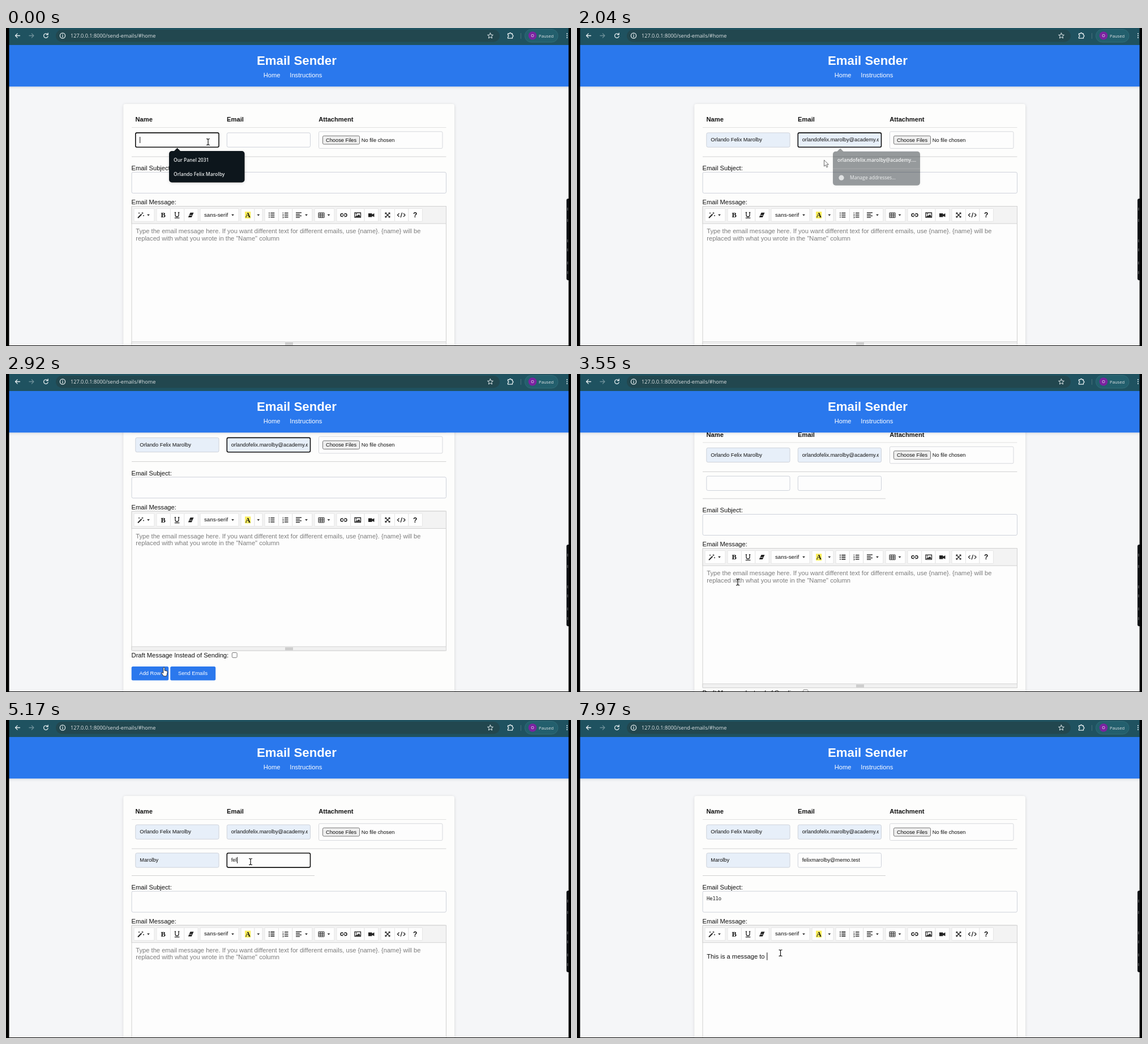
Write an HTML page that moves like this. It is 998 px wide and 561 px high and loops after 8000 ms.

```html
<!DOCTYPE html>
<html lang="en">
<head>
<meta charset="utf-8">
<title>Email Sender</title>
<style>
  html, body { margin: 0; width: 100%; height: 100%; overflow: hidden; background: #000; }
  svg { display: block; width: 100vw; height: 100vh; }
  text { font-family: "Liberation Sans", Arial, sans-serif; font-size: 11.15px; fill: #111; white-space: pre; }
  .small { font-size: 9.27px; }
  .bold { font-weight: 700; }
  .ui { font-family: "Open Sans", "Noto Sans", sans-serif; font-size: 8.5px; fill: #dfe3e5; }
  .semi { font-weight: 600; fill: #e8ebec; }
  .mono { font-family: "Noto Sans Mono", "DejaVu Sans Mono", monospace; font-size: 8.7px; }
  .hint { fill: #7d7d7d; }
  .white { fill: #fff; }
  .icon { fill: none; stroke: #222; stroke-width: 1.3; }
  .bar { fill: none; stroke: #e6eef0; stroke-width: 1.3; stroke-linecap: round; stroke-linejoin: round; }
</style>
</head>
<body>
<svg id="stage" viewBox="0 0 998 561" preserveAspectRatio="none"></svg>
<script>
const LOOP = 8000;
const PERSON = 'Orlando Felix Marolby';
const ADDRESS = 'orlandofelix.marolby@academy.example';
const SECOND_NAME = 'Marolby';
const SECOND_ADDRESS = 'felixmarolby@memo.test';
const MESSAGE = 'This is a message to ';
const ROW_HEIGHT = 47.7;

// Markup helpers
const text = (x, y, value, cls = '', id = '') =>
  `<text x="${x}" y="${y}" class="${cls}"${id && ` id="${id}"`}>${value}</text>`;
const rect = (x, y, w, h, fill, stroke = 'none', r = 0, extra = '') =>
  `<rect x="${x}" y="${y}" width="${w}" height="${h}" rx="${r}" fill="${fill}" stroke="${stroke}" ${extra}/>`;
const path = (d, cls = 'icon', extra = '') => `<path d="${d}" class="${cls}" ${extra}/>`;
const solid = (d, fill = '#222') => `<path d="${d}" fill="${fill}"/>`;
const line = (x1, x2, y, color) => path(`M${x1} ${y}H${x2}`, '', `stroke="${color}"`);
const group = (id, body, extra = '') => `<g id="${id}" ${extra}>${body}</g>`;
const drop = x => solid(`M${x - 2.4} 328.7h4.8l-2.4 2.8z`);

const field = (id, x, y) =>
  rect(x + .3, y + .4, 147.2, 25.3, '#fdfdfd', '#ced2da', 2.5, `id="${id}"`) +
  `<svg x="${x + 6}" y="${y}" width="137" height="26">${text(1.7, 15.9, '', 'small', id + 'Text')}</svg>`;

function menu(id, x, y, w, h, tip, body) {
  return group(id,
    rect(x, y, w, h, '#10171b', 'none', 5, 'filter="url(#shadow)"') +
    solid(`M${tip - 6} ${y + .5}l6 -6 6 6z`, '#10171b') + body);
}
function addressMenu(id, x, y, w, h, tip, first) {
  return menu(id, x, y, w, h, tip,
    text(x + 8, y + 18.5, first, 'ui semi') +
    line(x, x + w, y + 30.5, '#3a4145') +
    `<circle cx="${x + 15}" cy="${y + 46.5}" r="4.6" fill="#b9bec1"/>` +
    text(x + 30, y + 49.7, 'Manage addresses...', 'ui'));
}

function browserBar() {
  return rect(0, 0, 998, 30, '#1f5260') + rect(88, 3, 784, 21.5, '#22474f', 'none', 10.7) +
    path('M24.5 13.5h-8m3.6-3.6l-3.6 3.6 3.6 3.6', 'bar') +
    path('M41 13.5h8m-3.6-3.6l3.6 3.6-3.6 3.6', 'bar', 'opacity=".4"') +
    path('M73.4 11.2a3.8 3.8 0 1 0 .7 3.4M74.2 9v2.8h-2.8', 'bar') +
    `<circle cx="100" cy="13.5" r="4.6" class="bar"/>` + path('M100 13v2.8M100 11v.1', 'bar') +
    text(114, 17, '127.0.0.1:8000/send-emails/#home', 'ui', 'url') +
    path('M855.5 8.8l1.4 3.2 3.5.3-2.7 2.3.9 3.4-3.1-1.8-3.1 1.8.9-3.4-2.7-2.3 3.5-.3z', 'bar', 'style="stroke-width:1"') +
    path('M886.5 10h2.6a1.5 1.5 0 0 1 3 0h2.4v2.6a1.5 1.5 0 0 1 0 3v2.6h-8v-2.6a1.5 1.5 0 0 0 0-3z', 'bar') +
    path('M909.5 9v10', '', 'stroke="#47717b"') +
    rect(916.5, 2.5, 58.5, 22.5, '#235f6d', '#316c78', 11) +
    `<circle cx="930" cy="13.5" r="7.3" fill="#7a23a0"/>` +
    text(927.2, 16.3, 'O', 'ui white', 'initial') + text(941, 16.7, 'Paused', 'ui', 'paused') +
    [10, 13.5, 17].map(y => `<circle cx="991" cy="${y}" r="1" fill="#e6eef0"/>`).join('');
}

function banner() {
  return rect(0, 30, 998, 73.3, '#2b78ed', 'none', 0, 'filter="url(#shadow)"') +
    text(442.9, 65, 'Email Sender', 'bold white', 'title') +
    text(454.7, 86.9, 'Home', 'white') + text(501.3, 86.9, 'Instructions', 'white');
}

function toolbar() {
  const buttons = [[226, 36], [266, 24.4], [290.4, 24.4], [314.8, 24.4], [343, 68], [415, 24], [439, 14],
    [457, 24.4], [481.4, 24.4], [505.8, 35], [545, 35], [584, 24.6], [608.6, 24.6], [633.2, 24.6],
    [662, 24.5], [686.5, 24.5], [711, 24.5]];
  const rows = [326.5, 330, 333.5];
  return rect(222, 314.5, 555.5, 30.5, '#f3f3f3', '#d2d2d2') +
    buttons.map(([x, w]) => rect(x, 318.5, w, 22.7, '#fefefe', '#e5e5e5', 1)).join('') +
    path('M233 335l6.5-6.5', 'icon', 'style="stroke-width:2"') +
    path('M241 325v3M239.5 326.5h3M235 325.5v2M234 326.5h2M243 330v2M242 331h2', 'icon', 'style="stroke-width:.9"') +
    drop(251.5) +
    `<g font-weight="700">` + text(273.4, 334.3, 'B', 'glyph') +
    rect(422, 324, 10.2, 12, '#fbee5c') + text(422.7, 334, 'A', 'glyph') + '</g>' +
    path('M299 325.5v4.5a3 3 0 0 0 6 0v-4.5M297.7 325.5h2.5M303.8 325.5h2.5M297.8 335.2h8.6') +
    solid('M325.5 325.8h6l-3.7 8.2h-6z') + path('M323.5 330.5h5', '', 'stroke="#fff" stroke-width=".8"') +
    text(350, 332.8, 'sans-serif', '', 'family') + drop(400.5) + drop(445.8) +
    rows.map(y => path(`M464 ${y}h1.8M467.3 ${y}h7`, 'icon', 'style="stroke-width:1.7"') +
      path(`M492 ${y}h6.5`, 'icon', 'style="stroke-width:1.5"')).join('') +
    path('M489.3 325v2.6M488.4 329.2h1.7v1.5h-1.7M488.4 333h1.7v2h-1.7', 'icon', 'style="stroke-width:.8"') +
    [10, 7, 10, 7].map((w, i) => path(`M512 ${325.8 + i * 2.8}h${w}`)).join('') + drop(530.5) +
    path('M552 326h10v8.5h-10zM552 328.8h10M552 331.6h10M555.3 326v8.5M558.7 326v8.5', 'icon', 'style="stroke-width:1"') +
    drop(570) +
    path('M595.5 327.5h-2a2.5 2.5 0 0 0 0 5h2M597.5 327.5h2a2.5 2.5 0 0 1 0 5h-2M594.3 330h4.4', 'icon', 'style="stroke-width:1.5"') +
    path('M616 326h10.5v8h-10.5z') + solid('M617 333l2.5-3 1.5 1.5 2.5-3 2.5 4.5zM618 327.3h1.7v1.7h-1.7z') +
    solid('M640 327h6.5v2l4-2v6.5l-4-2v2h-6.5z') +
    path('M670.5 326.5l7 7M677.5 326.5l-7 7') +
    solid('M669.5 325.5h3.4l-3.4 3.4zM678.5 325.5v3.4l-3.4-3.4zM669.5 334.5v-3.4l3.4 3.4zM678.5 334.5h-3.4l3.4-3.4z') +
    path('M694.5 327l-3 3 3 3M702 327l3 3-3 3M699.7 325.8l-2.6 8.4') +
    text(719, 334.2, '?', 'bold', 'help');
}

function form() {
  const upper = text(228.5, 165.2, 'Name', 'bold') + text(390.1, 165.2, 'Email', 'bold') +
    text(552.2, 165.2, 'Attachment', 'bold') + line(222, 777.5, 175.5, '#e0e0e0') +
    field('name', 228.5, 184.5) + field('email', 390, 184.5) +
    rect(552.5, 182.8, 218.5, 29.6, '#fdfdfd', '#d6d8dc', 2) +
    rect(559.5, 190.3, 65, 14.7, '#efefef', '#767676', 2) +
    text(565, 200.8, 'Choose Files', 'small') + text(627.8, 200.8, 'No file chosen', 'small') +
    line(222, 777.5, 227, '#d2d2d2') +
    group('secondRow', field('name2', 228.5, 234.4) + field('email2', 390, 234.4) + line(222, 545, 274.5, '#d0d0d0'));
  const lower = text(221.6, 251.2, 'Email Subject:') +
    rect(222, 254.4, 555.5, 37, '#fdfdfd', '#ced2da', 2.5, 'id="subject"') +
    text(229, 270.4, '', 'mono', 'subjectText') +
    text(221.6, 311.4, 'Email Message:') +
    rect(222, 314.5, 555.5, 246, '#fdfdfd', '#cfcfcf', 2) + toolbar() +
    group('placeholder',
      text(229.3, 362, 'Type the email message here. If you want different text for different emails, use {name}. {name} will be', 'hint') +
      text(229.3, 374.8, 'replaced with what you wrote in the "Name" column', 'hint')) +
    text(229.3, 373, '', '', 'message') +
    rect(222, 553.5, 555.5, 7, '#f1f1f1', '#d4d4d4') +
    [555.5, 557.2, 558.9].map(y => line(493, 507, y, '#b5b5b5')).join('') +
    text(221.6, 572.8, 'Draft Message Instead of Sending:') +
    rect(399.3, 564, 8.8, 8.8, '#fff', '#777', 1.7) +
    rect(221.7, 588.5, 65.5, 24.6, '#2b78ed', 'none', 2.5) + text(235.5, 603.8, 'Add Row', 'small white') +
    rect(290.2, 588.5, 80, 24.6, '#2b78ed', 'none', 2.5) + text(304, 603.8, 'Send Emails', 'small white');
  return rect(207.5, 134, 584.5, 700, '#fdfdfc', 'none', 4, 'filter="url(#shadow)"') +
    upper + group('lower', lower);
}

const cursors =
  group('ibeam', path('M-3 -5.5q3 0 3 1.5q0-1.5 3-1.5M0 -4v8M-3 5.5q3 0 3-1.5q0 1.5 3 1.5', 'icon', 'style="stroke:#111;stroke-width:1.2"')) +
  group('arrow', path('M0 0v11l2.6-2.4 1.9 4.2 1.9-.9-1.9-4h3.5z', '', 'fill="#fff" stroke="#444" stroke-width=".8"')) +
  group('hand', path('M-1.2 1a1.2 1.2 0 0 1 2.4 0v4.6l4 .9q1.2.4 1 1.8l-.8 4.2q-.3 2-1.2 3h-4.7l-3.8-5q-.6-1.3.8-1.5l2.3 1.3z', '', 'fill="#fff" stroke="#222" stroke-width=".9"'));

const stage = document.getElementById('stage');
stage.innerHTML =
  `<defs>
    <filter id="shadow" x="-10%" y="-20%" width="120%" height="140%"><feDropShadow dx="0" dy="1" stdDeviation="2.5" flood-opacity=".14"/></filter>
    <clipPath id="view"><rect y="103" width="998" height="458"/></clipPath>
  </defs>
  <style>
    #title { font-size: 22.25px } #url { font-size: 9.15px } #paused { font-size: 7.7px } #initial { font-size: 7.2px }
    #family { font-size: 9.73px } #help { font-size: 12px }
    .glyph { font-family: "Liberation Serif", serif; font-size: 12.5px }
  </style>` +
  rect(0, 0, 998, 561, '#f5f6f8') +
  `<g clip-path="url(#view)">${group('page', form())}</g>` + banner() + browserBar() +
  menu('nameMenu', 288, 217, 133.5, 55.5, 302.5,
    text(296, 235.5, 'Our Panel 2031', 'ui semi') + text(296, 260.6, PERSON, 'ui semi')) +
  addressMenu('emailMenu', 452, 217.7, 154, 60, 465, 'orlandofelix.marolby@academy....') +
  addressMenu('secondMenu', 288, 266.5, 125.5, 61.5, 302.5, SECOND_NAME) +
  path('', '', 'id="caret" stroke="#111"') +
  group('cursor', cursors) +
  rect(990, 301, 8, 144, '#15171b', 'none', 3) +
  [320, 340, 376, 392, 415, 432].map(y => path(`M992 ${y - 3}v5`, '', 'stroke="#9a9a9a" stroke-width=".8"')).join('') +
  rect(0, 0, 5.5, 561, '#000') + rect(993.7, 0, 5, 561, '#000') + rect(0, 560, 998, 1, '#000');

const el = {};
stage.querySelectorAll('[id]').forEach(node => el[node.id] = node);

// Timeline
const pointer = [
  [0, 357, 201], [330, 357, 201], [720, 345, 255], [900, 345, 255], [1330, 452, 200], [1480, 452, 200],
  [1780, 480, 234], [1930, 480, 234], [2040, 436.5, 233], [2200, 410, 262], [2780, 279, 517.5],
  [3080, 279, 517.5], [3480, 284, 370], [3560, 284, 367], [4080, 309, 247], [4320, 309, 247],
  [4550, 309, 268], [4700, 310, 277], [4800, 310, 277], [5060, 432, 250], [5640, 432, 250],
  [5840, 385, 318], [6020, 385, 318], [6240, 359.5, 411], [8000, 359.5, 411]];
const shapes = [[0, 'ibeam'], [480, 'arrow'], [1220, 'ibeam'], [1570, 'arrow'], [2730, 'hand'], [3140, 'arrow'],
  [3320, 'ibeam'], [4440, 'arrow'], [4950, 'ibeam'], [5700, 'arrow'], [5780, 'ibeam'], [6060, 'arrow'], [6180, 'ibeam']];
const focuses = [[0, 'name'], [1400, 'email'], [3040, ''], [4140, 'name2'], [5040, 'email2'],
  [5850, 'subject'], [6220, ''], [6420, 'message']];
const scrolls = [[0, 0], [2220, 0], [2580, 72.5], [3470, 72.5], [3720, 0], [8000, 0]];

const current = (table, t) => table.filter(([start]) => start <= t).pop()[1];
const clamp = v => Math.max(0, Math.min(1, v));
const smooth = u => u * u * (3 - 2 * u);

function tween(keys, t) {
  const i = keys.findIndex(([time], n) => n && t <= time);
  const [t0, ...from] = keys[i - 1], [t1, ...to] = keys[i];
  const u = smooth((t - t0) / (t1 - t0));
  return from.map((v, n) => v + (to[n] - v) * u);
}
const typed = (value, t, start, step) => value.slice(0, Math.max(0, Math.floor((t - start) / step)));
const show = (node, visible) => { node.style.display = visible ? '' : 'none'; };

function fade(node, t, start, end) {
  const alpha = Math.min(clamp((t - start) / 60), 1 - clamp((t - end) / 130));
  show(node, alpha > 0);
  node.style.opacity = alpha;
}

function paintField(id, value, focused, filled) {
  el[id].setAttribute('fill', filled ? '#e7eff9' : '#fdfdfd');
  el[id].setAttribute('stroke', focused ? '#101010' : '#ced2da');
  el[id].setAttribute('stroke-width', focused ? 1.6 : 1);
  el[id + 'Text'].textContent = value;
}

function paintCaret(focus, scroll, added) {
  const spots = { name: [236.2, 192], name2: [236.2, 241.8], email2: [397.7, 241.8],
    subject: [229, 262 + added], message: [229.5, 362.5 + added] };
  const spot = spots[focus];
  show(el.caret, spot);
  if (!spot) return;
  const label = el[focus === 'message' ? focus : focus + 'Text'];
  const x = spot[0] + (label.textContent ? label.getComputedTextLength() + .5 : 0);
  el.caret.setAttribute('d', `M${x + .5} ${spot[1] - scroll}v${focus === 'message' ? 13.5 : 11}`);
}

function render(t) {
  const [scroll] = tween(scrolls, t);
  const [x, y] = tween(pointer, t);
  const focus = current(focuses, t);
  const shape = current(shapes, t);
  const added = t >= 3040 ? ROW_HEIGHT : 0;

  el.page.setAttribute('transform', `translate(0 ${-scroll})`);
  el.lower.setAttribute('transform', `translate(0 ${added})`);
  show(el.secondRow, added);

  paintField('name', t >= 850 ? PERSON : '', focus === 'name', t >= 850);
  paintField('email', t >= 1930 ? ADDRESS : '', focus === 'email', t >= 1930);
  paintField('name2', t >= 4760 ? SECOND_NAME : '', focus === 'name2', t >= 4760);
  // Typing pauses halfway through the address
  paintField('email2', typed(SECOND_ADDRESS, t < 5340 ? t : Math.max(5340, t - 210), 5100, 20), focus === 'email2', false);
  paintField('subject', typed('Hello', t, 5870, 40), focus === 'subject', false);

  show(el.placeholder, t < 6420);
  el.message.textContent = typed(MESSAGE, t, 6830, 53);
  fade(el.nameMenu, t, -100, 850);
  fade(el.emailMenu, t, 1460, 1966);
  fade(el.secondMenu, t, 4220, 4760);
  paintCaret(focus === 'email' && t < 1930 ? '' : focus, scroll, added);

  for (const id of ['ibeam', 'arrow', 'hand']) show(el[id], id === shape);
  el.cursor.setAttribute('transform', `translate(${x} ${y})`);
}

const begin = performance.now();
function frame() {
  render((performance.now() - begin) % LOOP);
  requestAnimationFrame(frame);
}
frame();
</script>
</body>
</html>
```
